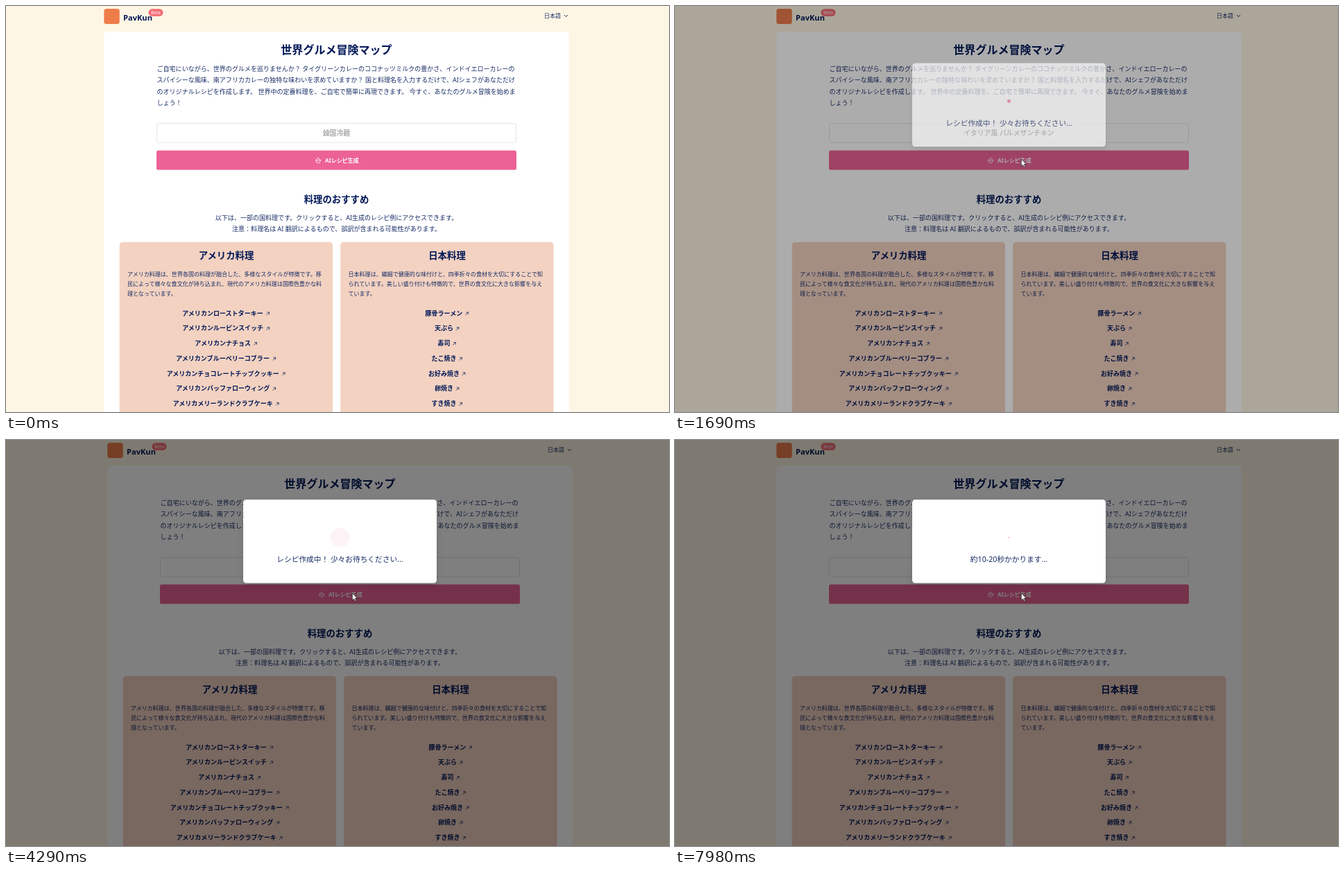
An HTML page that plays this animation: 956x586 px, repeating every 8000 ms.

```html
<!DOCTYPE html>
<html lang="ja">
<head>
<meta charset="utf-8">
<style>
html, body { margin: 0; width: 100%; height: 100%; overflow: hidden; background: #fef6e4; }
svg { display: block; width: 956px; height: 586px; }
text { font-family: "Noto Sans", "Noto Sans CJK JP", "Noto Sans CJK", sans-serif; fill: #172c66; }
.bold { font-weight: 700; fill: #001858; }
.mid { text-anchor: middle; }
.white { fill: #fff; }
.line { fill: none; stroke-linecap: round; stroke-linejoin: round; }
#modal rect { filter: drop-shadow(0 5px 4px rgba(0, 0, 0, .1)); }
</style>
</head>
<body>
<svg viewBox="0 0 956 586">
  <rect width="956" height="586" fill="#fef6e4"/>
  <g id="page">
    <rect x="141.3" y="4" width="22.4" height="22" rx="3.5" fill="#ee7c4b"/>
    <rect x="205.5" y="4.3" width="21" height="10.4" rx="5.2" fill="#f56a73"/>
    <path class="line" d="M805.2 13.2l2.3 2.3 2.3-2.3" stroke="#172c66"/>
    <rect x="141.3" y="37" width="670.7" height="570" rx="5" fill="#fff"/>
    <rect id="field" x="217.5" y="169.5" width="518" height="27.5" rx="2.2" fill="#fff"/>
    <rect id="button" x="217" y="208.5" width="519" height="28" rx="2.6"/>
    <path class="line" d="M446.3 222.6h7.8M447 222.6q.2 4 1.8 4h2.8q1.6 0 1.8-4M447.3 222.4q.7-2.5 2.9-2.5t2.9 2.5M450.2 219.7v-.9M448.9 224.4v.4M451.5 224.4v.4" stroke="#fff" stroke-width=".7"/>
    <rect x="163.7" y="340.7" width="307.3" height="260" rx="4.5" fill="#f3d2c1"/>
    <rect x="482.2" y="340.7" width="307.3" height="260" rx="4.5" fill="#f3d2c1"/>
    <g id="copy"></g>
    <rect id="caret" y="178" width="1" height="11" fill="#333"/>
  </g>
  <rect id="shade" width="956" height="586"/>
  <g id="modal">
    <rect x="342" y="86" width="279" height="120.5" rx="4.5" fill="#fff"/>
    <g id="pulse" fill="#ed6296"></g>
  </g>
  <path id="arrow" d="M0 0v10.4l2.4-2.2 1.6 3.5 1.7-.8-1.6-3.4h3.3z" fill="#fff" stroke="#222" stroke-width=".8"/>
  <path id="beam" class="line" d="M-2-6.5h1.5l.5.5.5-.5H2M0-6V6M-2 6.5h1.5l.5-.5.5.5H2" stroke="#333" stroke-width=".9"/>
</svg>
<script>
const $ = id => document.getElementById(id);
const LOOP = 8000, BODY = 9.04, SMALL = 8.04;

function add(parent, tag, attrs) {
  const node = document.createElementNS('http://www.w3.org/2000/svg', tag);
  set(node, attrs);
  return parent.appendChild(node);
}
function set(node, attrs) {
  for (const key in attrs) node.setAttribute(key, attrs[key]);
}
// cy is the middle of the line
function label(str, x, cy, size, cls = '', parent = $('copy')) {
  const node = add(parent, 'text', { x, y: cy + .38 * size, 'font-size': size, class: cls });
  node.textContent = str;
  return node;
}
function lines(list, x, cy, step, size, cls) {
  list.forEach((str, i) => label(str, x, cy + i * step, size, cls));
}

label('PavKun', 169, 17, 11.1, 'bold');
label('Beta', 216, 9.3, 6.5, 'mid white');
label('日本語', 776, 14, 8);
label('世界グルメ冒険マップ', 476.5, 63, 16.05, 'bold mid');
lines([
  'ご自宅にいながら、世界のグルメを巡りませんか？ タイグリーンカレーのココナッツミルクの豊かさ、インドイエローカレーの',
  'スパイシーな風味、南アフリカカレーの独特な味わいを求めていますか？ 国と料理名を入力するだけで、AIシェフがあなただけ',
  'のオリジナルレシピを作成します。 世界中の定番料理を、ご自宅で簡単に再現できます。 今すぐ、あなたのグルメ冒険を始めま',
  'しょう！'
], 217.5, 91, 16.05, BODY);
const entry = label('', 476.5, 183.5, 9.9, 'bold mid');
label('AIレシピ生成', 460, 223, 8, 'bold white');
label('料理のおすすめ', 476.5, 278.5, 13.4, 'bold mid');
lines([
  '以下は、一部の国料理です。クリックすると、AI生成のレシピ例にアクセスできます。',
  '注意：料理名は AI 翻訳によるもので、誤訳が含まれる可能性があります。'
], 476.5, 305.7, 16.1, BODY, 'mid');

function cuisine(left, title, about, dishes) {
  const cx = left + 153.8;
  label(title, cx, 360, 13.4, 'bold mid');
  lines(about, left + 11.3, 386.5, 14.4, SMALL);
  dishes.forEach((dish, i) => {
    const cy = 443.3 + i * 21.75, width = dish.length * BODY, x = cx - (width + 9) / 2;
    label(dish, x, cy, BODY, 'bold');
    add($('copy'), 'path', {
      d: `M${x + width + 4} ${cy + 2.6}l3.8-3.8m-2.8 0h2.8v2.8`,
      class: 'line', stroke: '#172c66', 'stroke-width': .8
    });
  });
}
cuisine(163.7, 'アメリカ料理', [
  'アメリカ料理は、世界各国の料理が融合した、多様なスタイルが特徴です。移',
  '民によって様々な食文化が持ち込まれ、現代のアメリカ料理は国際色豊かな料',
  '理となっています。'
], ['アメリカンローストターキー', 'アメリカンルーピンスイッチ', 'アメリカンナチョス',
  'アメリカンブルーベリーコブラー', 'アメリカンチョコレートチップクッキー',
  'アメリカンバッファローウィング', 'アメリカメリーランドクラブケーキ']);
cuisine(482.2, '日本料理', [
  '日本料理は、繊細で健康的な味付けと、四季折々の食材を大切にすることで知',
  'られています。美しい盛り付けも特徴的で、世界の食文化に大きな影響を与え',
  'ています。'
], ['豚骨ラーメン', '天ぷら', '寿司', 'たこ焼き', 'お好み焼き', '卵焼き', 'すき焼き']);

const message = label('', 481.5, 172.3, 10.7, 'mid', $('modal'));
const rings = [0, 200, 400].map(delay => ({
  delay, node: add($('pulse'), 'circle', { cx: 481.5, cy: 140.7 })
}));

const ramp = (t, from, to) => Math.min(1, Math.max(0, (t - from) / (to - from)));
const mix = (a, b, k) => a + (b - a) * k;

function bezier(x1, y1, x2, y2) {
  const curve = (a, b, s) => 3 * a * s * (1 - s) ** 2 + 3 * b * s * s * (1 - s) + s ** 3;
  return x => {
    let lo = 0, hi = 1;
    for (let i = 0; i < 20; i++) {
      const s = (lo + hi) / 2;
      if (curve(x1, x2, s) < x) lo = s; else hi = s;
    }
    return curve(y1, y2, (lo + hi) / 2);
  };
}
const fade = bezier(.4, 0, .2, 1), puff = bezier(.52, .6, .25, .99);

function draw(t) {
  const open = t < 1546 ? 0 : fade(ramp(t, 1546, 1891));
  const typed = t >= 640, focused = t >= 260 && t < 1600;

  set($('page'), { transform: `translate(${t < 1546 ? 0 : 5})` });
  set($('field'), { stroke: focused ? '#d9cfd3' : '#e4e4e6' });
  entry.textContent = typed ? 'イタリア風 パルメザンチキン' : '韓国冷麺';
  entry.style.fill = typed ? '#444' : '#aaa';
  const caretOn = t >= 260 && t < 640 || t >= 690 && t < 1230;
  set($('caret'), { x: typed ? 541 : 476, opacity: +caretOn });

  const press = ramp(t, 1510, 1560) * (1 - ramp(t, 1590, 1657));
  const pink = [[237, 202], [98, 49], [150, 104]].map(([a, b]) => Math.round(mix(a, b, press)));
  set($('button'), { fill: `rgb(${pink})` });

  set($('shade'), { opacity: open / 2 });
  set($('modal'), { opacity: open, transform: `translate(0 ${-10 * (1 - open)})` });
  message.textContent = t < 4580 ? 'レシピ作成中！ 少々お待ちください...'
    : t < 7580 ? 'AIシェフがあなたのオリジナルレシピを考え中です...'
    : '約10-20秒かかります...';
  const cycle = t < 1532 ? 0 : (t - 1532) % 1600;
  for (const { delay, node } of rings) {
    const k = puff(ramp(cycle, delay, delay + 1200));
    set(node, { r: 14.67 * k, opacity: 1 - k });
  }

  const move = fade(ramp(t, 840, 1080));
  const x = mix(497.5, 499.3, move), y = t < 260 ? 205 : mix(183, 221, move);
  const inField = y < 197;
  set($('arrow'), { transform: `translate(${x} ${y})`, opacity: +(t >= 130 && !inField) });
  set($('beam'), { transform: `translate(${x} ${y})`, opacity: +inField });
}

function tick() {
  draw(performance.now() % LOOP);
  requestAnimationFrame(tick);
}
tick();
</script>
</body>
</html>
```
